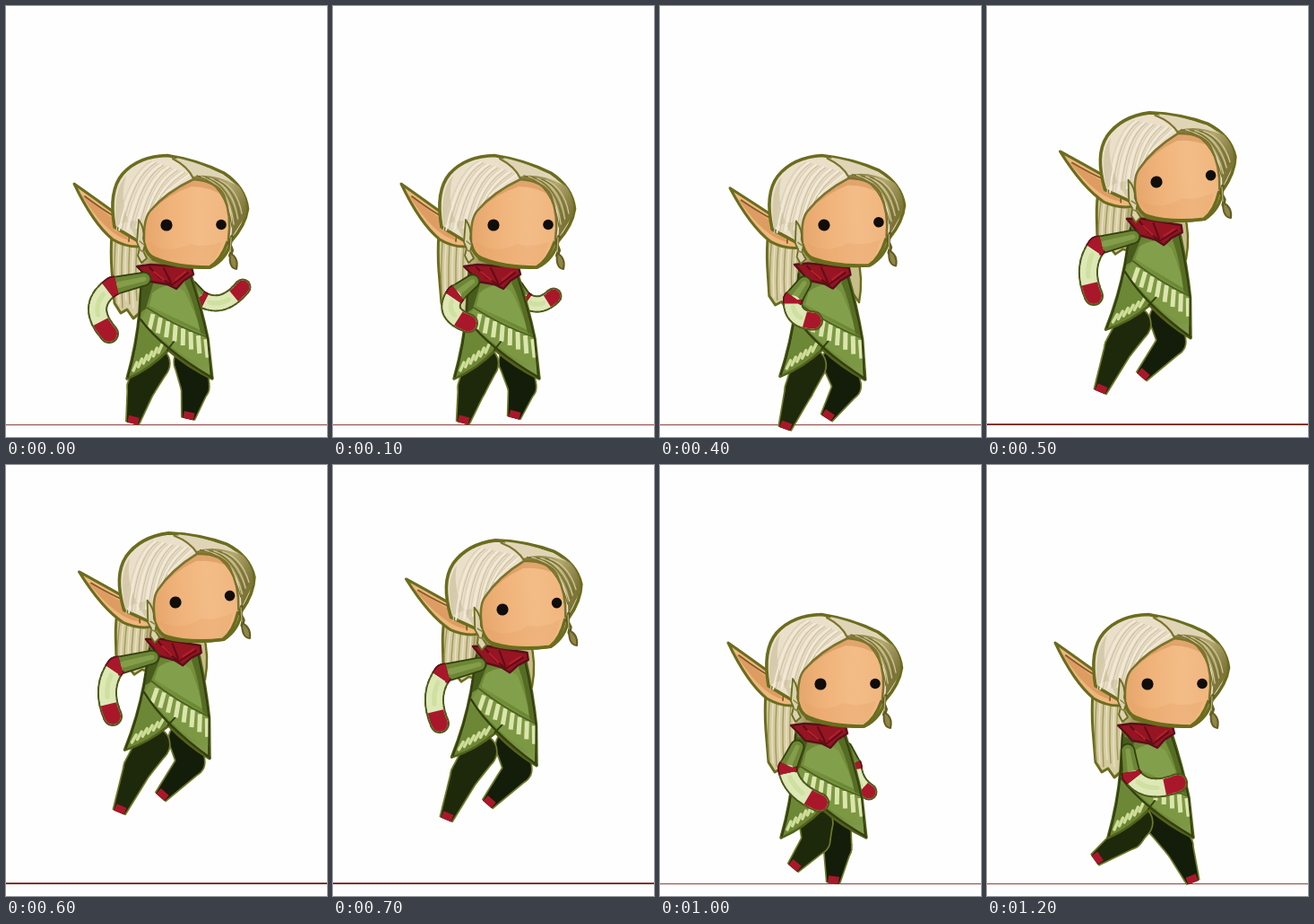
An HTML page with a canvas for the animation above (1.3 s loop, 358 by 480 pixels).

```html
<!DOCTYPE html>
<html lang="en">
<head>
<meta charset="utf-8">
<title>Elf walk</title>
<style>
html, body { margin: 0; width: 100%; height: 100%; overflow: hidden; background: #fefefe; }
canvas { display: block; }
</style>
</head>
<body>
<canvas id="stage" width="358" height="480"></canvas>
<script>
const ctx = document.getElementById('stage').getContext('2d');
const LOOP = 1300, STEP = 100;
const OLIVE = '#6a6d1e', DARK = '#34400f', RED = '#a9182a', WINE = '#58101a';
const CREAM = '#dde8b6', HAIR = '#eadfc9', SKIN = '#efb67d';

// near / far arm: shoulder, elbow, bend, hand; back / fore leg: hip, knee, foot
const stride = {
  near: [[154, 304], [119, 312], [102, 336], [115, 365]],
  far: [[207, 312], [217, 326], [241, 330], [264, 313]],
  back: [[164, 398], [151, 424], [141, 465]],
  fore: [[206, 396], [211, 424], [203, 460]]
};
const gather = {
  near: [[159, 312], [173, 339], [193, 347], [223, 330]],
  far: [[205, 314], [206, 328], [207, 336], [210, 343]],
  back: [[169, 398], [163, 426], [152, 464]],
  fore: [[199, 396], [211, 424], [199, 457]]
};
const leap = {
  near: [[163, 305], [123, 315], [113, 341], [119, 371]],
  far: [[205, 312], [203, 328], [202, 340], [204, 350]],
  back: [[164, 402], [147, 428], [126, 478]],
  fore: [[200, 396], [206, 422], [172, 461]]
};
const pass = {
  near: [[153, 314], [142, 338], [153, 360], [178, 376]],
  far: [[208, 315], [216, 335], [221, 352], [233, 364]],
  back: [[174, 398], [174, 418], [148, 449]],
  fore: [[194, 396], [198, 426], [193, 466]]
};
const push = {
  near: [[157, 318], [161, 345], [182, 359], [213, 354]],
  far: [[203, 312], [205, 326], [204, 334], [204, 342]],
  back: [[166, 398], [159, 412], [120, 440]],
  fore: [[196, 398], [214, 424], [230, 465]]
};
const keys = [[0, stride], [3, gather], [5, leap], [7, leap], [8, stride], [10, pass], [12, push]];
const LIFT = { 5: 48, 6: 91, 7: 83 };

const mix = (a, b, u) => a + (b - a) * u;
const mixPt = (a, b, u) => [mix(a[0], b[0], u), mix(a[1], b[1], u)];

function poseAt(step) {
  let i = 0;
  while (i < keys.length - 2 && keys[i + 1][0] <= step) i++;
  const [from, a] = keys[i], [to, b] = keys[i + 1];
  const u = Math.min(1, (step - from) / (to - from)), pose = {};
  for (const part in a) pose[part] = a[part].map((p, n) => mixPt(p, b[part][n], u));
  return pose;
}

function fill(d, color) {
  ctx.fillStyle = color;
  ctx.fill(new Path2D(d));
}

function line(d, color, width) {
  ctx.strokeStyle = color;
  ctx.lineWidth = width;
  ctx.stroke(new Path2D(d));
}

function shape(d, color, edge, width) {
  fill(d, color);
  line(d, edge, width);
}

function fade(x0, y0, x1, y1, ...colors) {
  const g = ctx.createLinearGradient(x0, y0, x1, y1);
  colors.forEach((c, i) => g.addColorStop(i / (colors.length - 1), c));
  return g;
}

function dot(x, y, r, color) {
  ctx.fillStyle = color;
  ctx.beginPath();
  ctx.arc(x, y, r, 0, 7);
  ctx.fill();
}

// Tapered chain of segments with round joints; flat leaves the last end square
function chain(pts, widths, color, grow = 0, flat = false) {
  pts.forEach((p, i) => {
    const r = widths[i] / 2 + grow, q = pts[i + 1];
    if (q || !flat) dot(p[0], p[1], r, color);
    if (!q) return;
    const s = widths[i + 1] / 2 + grow;
    const a = Math.atan2(q[1] - p[1], q[0] - p[0]) + Math.PI / 2;
    const c = Math.cos(a), n = Math.sin(a);
    ctx.beginPath();
    ctx.moveTo(p[0] + c * r, p[1] + n * r);
    ctx.lineTo(q[0] + c * s, q[1] + n * s);
    ctx.lineTo(q[0] - c * s, q[1] - n * s);
    ctx.lineTo(p[0] - c * r, p[1] - n * r);
    ctx.fill();
  });
}

function leg([hip, knee, foot], tint) {
  const w = [36, 30, 13];
  chain([hip, knee, foot], w, '#6f7a2a', 1.7, true);
  chain([hip, knee, foot], w, tint, 0, true);
  const shin = [foot[0] - knee[0], foot[1] - knee[1]];
  ctx.strokeStyle = RED;
  ctx.lineWidth = 12;
  ctx.lineCap = 'butt';
  ctx.beginPath();
  ctx.moveTo(...mixPt(foot, knee, 8 / Math.hypot(...shin)));
  ctx.lineTo(...foot);
  ctx.stroke();
  ctx.lineCap = 'round';
}

function arm([shoulder, elbow, bend, hand], size) {
  const ctrl = bend.map((v, i) => 2 * v - (elbow[i] + hand[i]) / 2);
  const at = u => mixPt(mixPt(elbow, ctrl, u), mixPt(ctrl, hand, u), u);
  const run = (a, b) => Array.from({ length: 9 }, (_, i) => at(mix(a, b, i / 8)));
  const w = Array(9).fill(size);
  chain([shoulder, elbow], [size - 5, size], DARK, 1.8);
  chain(run(0, 1), w, '#4f5a1a', 2);
  chain([shoulder, elbow], [size - 5, size], '#6c8636');
  chain([shoulder, mixPt(shoulder, elbow, .8)], [5, 7], '#839d4b');
  chain(run(.1, 1), w, CREAM);
  chain(run(.2, .65), Array(9).fill(5), '#cfe0a0');
  // Cuff and glove are cut square across the limb
  ctx.lineCap = 'butt';
  ctx.beginPath();
  run(.78, .99).forEach(p => ctx.lineTo(...p));
  ctx.strokeStyle = RED;
  ctx.lineWidth = size;
  ctx.stroke();
  dot(hand[0], hand[1], size / 2, RED);
  ctx.beginPath();
  ctx.moveTo(...mixPt(shoulder, elbow, .88));
  ctx.lineTo(...elbow);
  ctx.lineTo(...at(.1));
  ctx.strokeStyle = WINE;
  ctx.lineWidth = size + 4;
  ctx.stroke();
  ctx.strokeStyle = RED;
  ctx.lineWidth = size + 1;
  ctx.stroke();
  ctx.lineCap = 'round';
}

function backHair() {
  const d = 'M124 205 Q115 255 118 295 L121 331 L128 342 L135 338 L142 348 L150 341 L158 344 Q180 320 200 288 L160 220 Z';
  shape(d, fade(116, 0, 172, 0, '#cfc698', '#d8cea6', '#857c3c'), OLIVE, 3);
  for (let i = 0; i < 9; i++) {
    const x = 121 + i * 4;
    line(`M${x + 3} 240 Q${x - 2} 290 ${x + 1} ${328 + i % 3 * 4}`, i % 2 ? '#e9e1c6' : '#a3995c', 1.4);
  }
}

function tunic() {
  const d = 'M152 296 L205 296 Q218 336 225 370 L230 415 Q203 402 181 383 Q160 404 135 415 Q146 376 149 340 Z';
  shape(d, fade(145, 300, 228, 400, '#5a7226', '#78923e', '#6b8734', '#7f994a'), '#54611b', 3.4);
  fill('M163 320 Q180 304 199 318 Q211 340 217 361 L160 334 Z', '#82a04c');
  fill('M150 302 L165 306 L156 337 L149 342 Z', '#475c1c');
  fill('M205 298 Q218 336 225 369 L217 364 Q210 330 199 308 Z', '#566c24');
  // lower flap
  fill('M148 352 L180 382 Q160 403 137 413 Q147 380 148 352', '#6c8736');
  for (let i = 0; i < 6; i++) {
    const x = 142 + i * 5.6, y = 406 - i * 4;
    line(`M${x} ${y} l4 -9`, '#cfdd98', 3.4);
  }
  // patterned band
  fill('M157 337 L225 368 L229 402 Q204 396 185 380 L150 351 Z', '#7c9843');
  ctx.lineCap = 'butt';
  for (let i = 0; i < 8; i++) {
    const x = 164 + i * 8.4, y = 343 + i * 4;
    line(`M${x} ${y} l${-4 + i * .9} ${17 + i * .5}`, '#dbe5ac', 5);
  }
  ctx.lineCap = 'round';
  line('M150 349 Q175 382 230 414', DARK, 2.4);
  line('M157 336 Q190 357 225 369', '#4d6320', 1.8);
  line('M180 383 L187 374', DARK, 2);
  line('M151 300 L149 342 Q146 378 136 413', DARK, 2.2);
  line('M205 299 Q218 338 225 371 L229 413', DARK, 2);
}

function scarf() {
  shape('M146 290 L161 288 L207 291 L209 299 L198 306 L190 315 L180 310 L162 307 L155 299 Z', '#951522', WINE, 2.4);
  line('M160 291 L172 303 L184 310 M185 311 L203 297 M176 292 L184 308', '#610c16', 2);
  line('M165 296 L176 305 M189 305 L200 296', '#b5202c', 2);
}

function head() {
  // ear
  shape('M76 198 Q103 217 125 233 Q137 238 149 240 L150 268 Q134 269 119 260 Q97 242 76 198 Z', SKIN, OLIVE, 3);
  fill('M84 210 Q108 228 128 243 L137 261 Q112 255 84 210', '#dd9d62');
  line('M88 212 Q116 233 132 240 Q136 246 131 249 Q139 252 137 262', '#85592a', 1.8);

  // skull and face
  const top = 'M121 246 Q114 206 130 187 Q148 167 180 166.5 Q215 172 243 186 Q267 202 269.5 226 Q267 244 251 262 Q246 282 228 291 Q190 292 164 282 L154 266 Z';
  shape(top, HAIR, OLIVE, 3.6);
  const face = 'M154 268 Q152 246 160 229 Q178 206 209 193 Q236 195 244 212 Q253 238 246 264 Q239 283 227 291 Q190 291 165 281 Z';
  fill(face, fade(154, 0, 248, 0, '#e6a66c', '#f0b47b', '#f3bc87', '#f0b67f'));
  fill('M159 262 Q178 278 205 265 Q219 270 241 263 Q234 286 225 289 Q187 289 165 279 Z', 'rgba(222,151,90,.22)');
  fill('M161 229 Q178 206 209 193 Q236 195 244 212 Q226 201 207 201 Q180 210 161 229', 'rgba(190,120,60,.35)');
  line('M154 265 Q157 278 166 281 Q190 291 227 291 Q240 283 247 263', OLIVE, 3.6);

  // right side of the hair
  fill('M207 190 Q237 181 260 201 Q271 216 267 234 L251 259 Q255 232 245 214 Q235 197 209 193 Z',
    fade(214, 194, 268, 226, '#877c40', '#b3a970', '#7d7438'));
  fill('M190 169 Q232 178 256 199 Q230 185 208 190 Z', '#dfd5b6');
  for (let i = 0; i < 6; i++)
    line(`M${213 + i * 5} ${189 + i} Q${245 + i * 2.6} ${198 + i} ${252 + i * 2.2} ${246 - i * 3}`, i % 2 ? '#cec598' : '#756d2c', 1.3);

  // left side strands
  fill('M123 245 Q119 205 134 189 Q123 222 148 264 L153 266 L153 241 Q140 236 123 245', '#d5caaa');
  for (let i = 0; i < 17; i++) {
    const x = 123 + i * 3.2, y = 250 - Math.max(0, i - 8) * 4 - i * .4;
    line(`M${162 + i * 2.7} ${173 + i * .9} Q${136 + i * 3} ${186 + i} ${x} ${y}`,
      ['#dacfb3', '#f2ead9', '#cbbf9c'][i % 3], i % 3 === 1 ? 2 : 1.1);
  }
  line('M154 262 Q153 237 161 228 Q179 207 209 193 Q235 195 243 211 Q252 234 248 260', '#7b732c', 2.6);
  line('M186 170 Q203 179 209 192', '#7b732c', 2.2);

  // braids
  shape('M148 238 Q155 248 153 259 L155 266 L153 273 L157 281 L151 286 L147 278 L149 270 L146 263 Z', '#dcd1b0', OLIVE, 1.8);
  line('M149 262 L154 266 M148 271 L154 274', '#8b8245', 1.6);
  line('M252 257 L249 264 L252 272 L250 278', '#625d22', 4);
  line('M251 258 L250 276', '#b3a970', 1.3);
  shape('M250 275 Q260 281 257 293 Q248 292 250 275', '#8f8648', '#625d22', 2);

  dot(179, 244, 6.6, '#100d0a');
  dot(240, 243.5, 5.8, '#100d0a');
}

function turned(x, y, angle, draw) {
  ctx.save();
  ctx.translate(x, y);
  ctx.rotate(angle);
  ctx.translate(-x, -y);
  draw();
  ctx.restore();
}

function render(now) {
  const step = Math.floor(now % LOOP / STEP);
  const pose = poseAt(step), lift = LIFT[step] || 0;
  const air = lift ? 1 : step === 4 ? .4 : 0;
  ctx.lineJoin = ctx.lineCap = 'round';
  ctx.fillStyle = '#fefefe';
  ctx.fillRect(0, 0, 358, 480);
  ctx.fillStyle = lift ? '#7d3528' : '#8a4440';
  ctx.fillRect(0, lift ? 465 : 466, 358, lift ? 2 : 1);

  ctx.save();
  ctx.translate(0, -lift);
  if (air) shape('M200 284 Q213 302 211 314 L222 330 Q227 303 220 279 Z', '#c7bd88', OLIVE, 2.4);
  ctx.save();
  // hair floats up and out during the jump
  ctx.transform(1, 0, -.06 * air, 1 - .2 * air, 22 * air, 46 * air);
  backHair();
  ctx.restore();
  arm(pose.far, 15);
  leg(pose.fore, '#141d0a');
  leg(pose.back, '#1e290c');
  turned(180, 416, .1 * air, () => {
    ctx.translate(-3 * air, -2 * air);
    tunic();
    scarf();
  });
  arm(pose.near, 18);
  ctx.translate(10 * air, 0);
  turned(179, 244, -.113 * air, head);
  ctx.restore();
}

const start = performance.now();
function tick() {
  render(performance.now() - start);
  requestAnimationFrame(tick);
}
tick();
</script>
</body>
</html>
```
